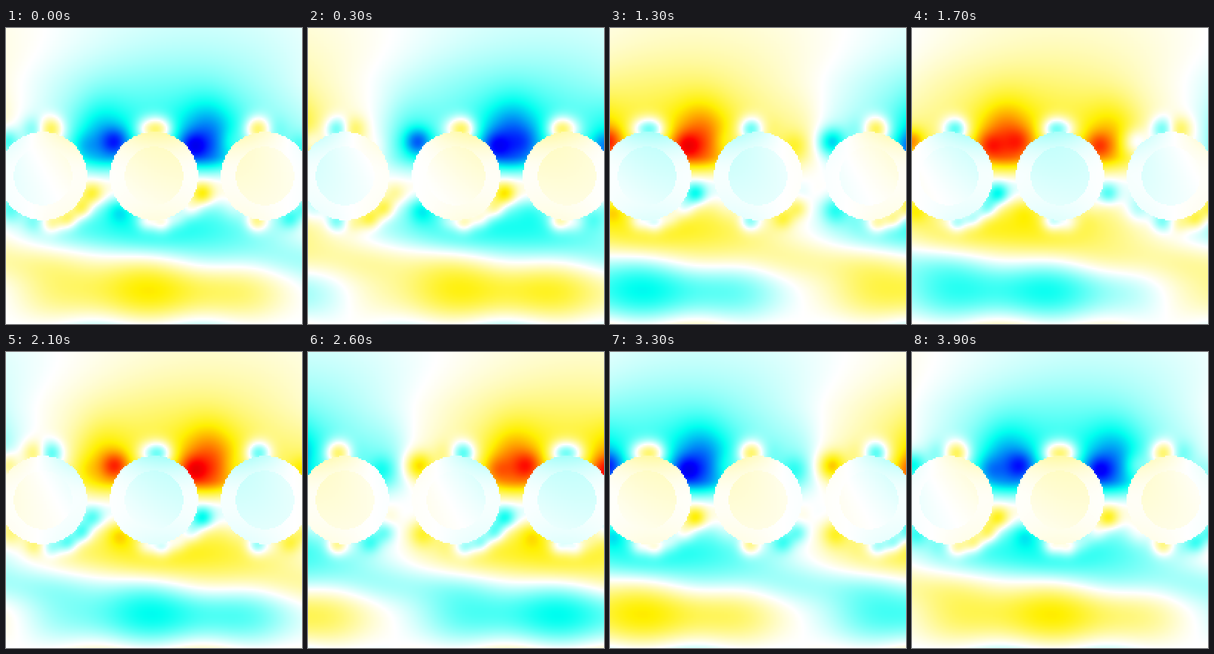
Animation of 400 by 400 pixels, one loop 4 s. Source, as an HTML page with a canvas:

```html
<!DOCTYPE html>
<html lang="en">
<head>
<meta charset="utf-8">
<title>Travelling wave along a row of cylinders</title>
<style>
html, body { margin: 0; width: 100%; height: 100%; overflow: hidden; background: #fff; }
canvas { display: block; width: 400px; height: 400px; image-rendering: pixelated; }
</style>
</head>
<body>
<canvas id="stage" width="200" height="200"></canvas>
<script>
const N = 200, PX = 2, LOOP = 4000, STEPS = 40;
const PITCH = 150, MID = 200, R_OUT = 59.6, R_CORE = 39.5;
const RAD = Math.PI / 180;
const K = 66 / PITCH; // phase advance in degrees per pixel

const wrap = d => d - PITCH * Math.round(d / PITCH);
const clamp = v => Math.min(1, Math.max(0, v));
const ramp = (a, b, v) => {
  const t = clamp((v - a) / (b - a));
  return t * t * (3 - 2 * t);
};
const bell = u => Math.exp(-u * u / 2);
const polar = (amp, deg) => [amp * Math.cos(deg * RAD), amp * Math.sin(deg * RAD)];
const sum = (...parts) => parts.reduce(([a, b], [c, d]) => [a + c, b + d]);

// Smooth local peak at (cx, cy), repeated for every cylinder
const lobe = (dx, y, cx, cy, size, amp, deg) =>
  polar(amp * bell(wrap(dx - cx) / size) * bell((y - cy) / size), deg);

// Field above the row, strongest in the gaps
function upper(dx, y) {
  const gap = bell(wrap(dx - 75) / 26) * bell((y - 155) / 36);
  const amp = -.05 - .3 * bell((y - 150) / 70) - .43 * gap;
  return polar(amp * (1 - ramp(172, 214, y)), -11 - 14 * (1 - ramp(0, 80, y)));
}

// Banded field below the row, turning in phase from one band to the next
function lower(dx, y) {
  const band = -.36 * Math.cos(Math.PI * (y - 270) / 85) * ramp(200, 245, y);
  const ripple = .05 * ramp(285, 330, y) * Math.cos(2 * Math.PI * (dx + 8) / PITCH);
  return sum(polar(band + ripple, 0), polar(.14 * bell((y - 314) / 20), 90));
}

// Bright spots hugging the cylinder wall
function rim(dx, y) {
  const spots = [
    lobe(dx, y, 52, 160, 13, -.33, -24),
    lobe(dx, y, -51, 154, 13, -.42, 62),
    lobe(dx, y, -46, 245, 13, -.28, 56)
  ];
  for (const side of [-1, 1]) {
    spots.push(lobe(dx, y, 10 * side, 137, 12, .48, -8 + 33 * side));
  }
  for (let i = 0; i < 5; i++) {
    const [cx, cy] = polar(62 + 2 * i, 100 - 20 * i);
    spots.push(lobe(dx, y, cx, MID + cy, 10, .38, -35 + 85 * Math.sin(.7 * i)));
  }
  return sum(...spots);
}

const outside = (dx, y) => sum(upper(dx, y), lower(dx, y), rim(dx, y));

function ring(dx, y) {
  const u = (y - MID) / 55;
  return polar(.015 + (u < 0 ? .11 : .03) * u * u, -8 + .6 * dx);
}

const core = (dx, y) =>
  polar(.068 - .0006 * (y - MID), -28 + .3 * dx - .4 * (y - MID));

function field(x, y) {
  const dx = wrap(x - MID), r = Math.hypot(dx, y - MID);
  const part = r < R_CORE ? core : r < R_OUT ? ring : outside;
  const [re, im] = part(dx, y);
  const [c, s] = polar(1, K * (x - MID));
  return [re * c - im * s, re * s + im * c];
}

const real = new Float32Array(N * N), imag = new Float32Array(N * N);
for (let j = 0; j < N; j++) {
  for (let i = 0; i < N; i++) {
    [real[j * N + i], imag[j * N + i]] = field((i + .5) * PX, (j + .5) * PX);
  }
}

const ctx = document.getElementById("stage").getContext("2d");
const image = ctx.createImageData(N, N);
const data = image.data;

// White to turquoise to blue below zero, white to yellow to red above
function paint(k, v) {
  const m = Math.abs(v), tint = clamp(m / .4), deep = clamp((m - .4) / .5);
  const fade = 255 * (1 - tint);
  const full = 255 * (1 - clamp(m - .9));
  const dip = 1 - .06 * tint;
  data[k] = v < 0 ? fade : full;
  data[k + 1] = 255 * (1 - deep) * (v < 0 ? 1 : dip);
  data[k + 2] = v < 0 ? full * (dip + .06 * deep) : fade;
  data[k + 3] = 255;
}

let shown = -1;
function draw(now) {
  const step = Math.floor((now % LOOP) / LOOP * STEPS);
  if (step === shown) return;
  shown = step;
  const [c, s] = polar(1, 360 * step / STEPS);
  for (let n = 0; n < N * N; n++) paint(4 * n, real[n] * c + imag[n] * s);
  ctx.putImageData(image, 0, 0);
}

let start = null;
function tick(now) {
  if (start === null) start = now;
  draw(Math.max(0, now - start));
  requestAnimationFrame(tick);
}
draw(0);
requestAnimationFrame(tick);
</script>
</body>
</html>
```
